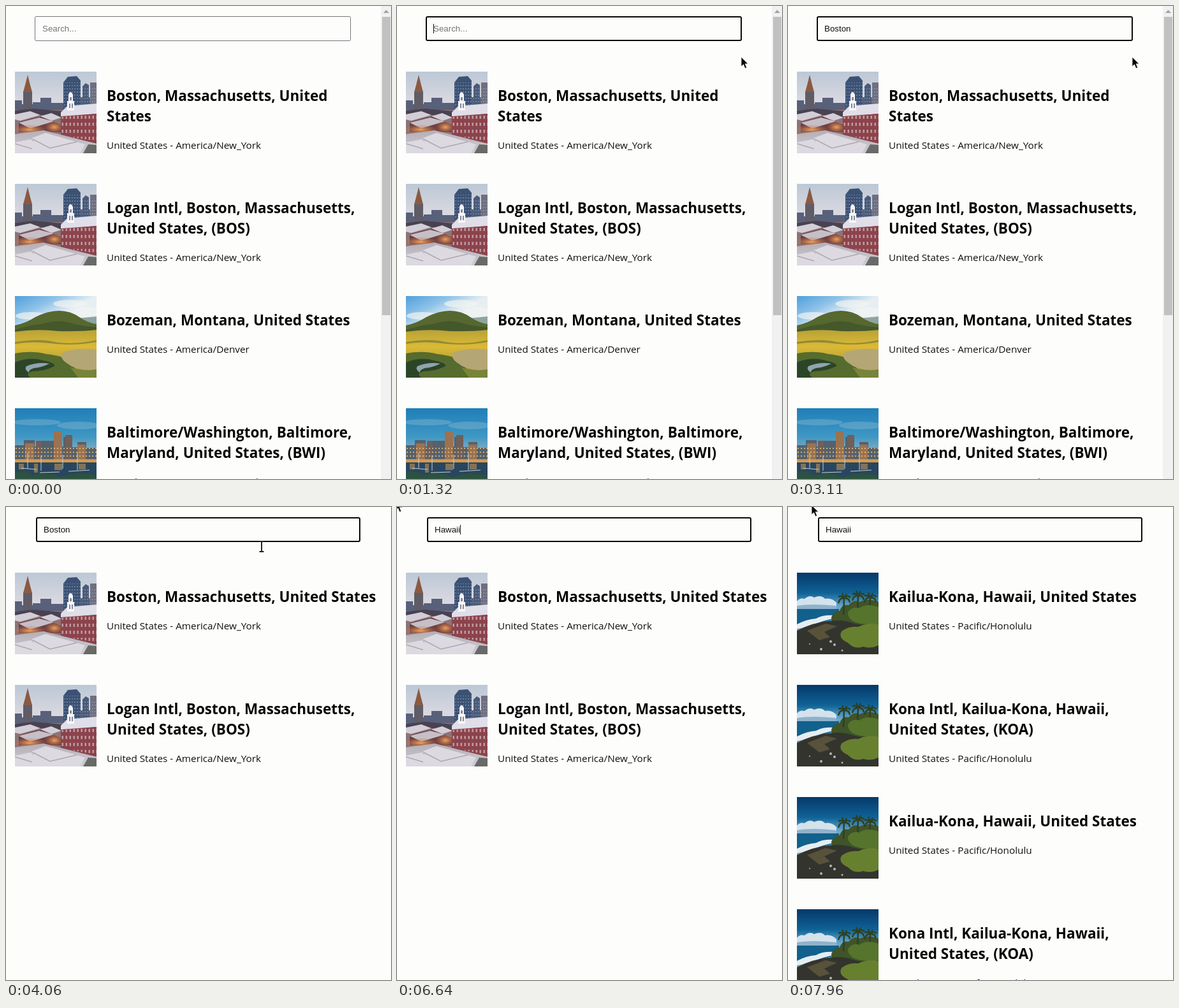
An HTML page for the animation above (8 s loop, 604 by 742 pixels).

```html
<!DOCTYPE html>
<html lang="en">
<head>
<meta charset="utf-8">
<title>Destination search</title>
<style>
  html, body { margin: 0; width: 100%; height: 100%; overflow: hidden; background: #fdfdfc; }
  svg { display: block; }
  .title { font: 700 22.5px "Open Sans", "Noto Sans", sans-serif; fill: #060606; }
  .zone { font: 400 15.3px "Open Sans", "Noto Sans", sans-serif; fill: #101010; }
  .field { font: 13.33px "Liberation Sans", Arial, sans-serif; white-space: pre; }
</style>
</head>
<body>
<svg id="stage" width="604" height="742" viewBox="0 0 604 742">
  <defs>
    <linearGradient id="citySky" x2="0" y2="1"><stop stop-color="#bcc8d6"/><stop offset=".45" stop-color="#e0dce2"/></linearGradient>
    <linearGradient id="hillSky" x2=".5" y2="1"><stop stop-color="#4f9fdc"/><stop offset=".22" stop-color="#8ec2e8"/><stop offset=".4" stop-color="#e6eef2"/></linearGradient>
    <linearGradient id="harborSky" x2="0" y2="1"><stop stop-color="#1f7fb8"/><stop offset=".35" stop-color="#3f97c4"/><stop offset=".55" stop-color="#8fb0c0"/></linearGradient>
    <linearGradient id="islandSky" x2="0" y2="1"><stop stop-color="#06386a"/><stop offset=".25" stop-color="#0f6396"/><stop offset=".42" stop-color="#6ba9cc"/></linearGradient>
    <linearGradient id="meadow" x2="0" y2="1"><stop stop-color="#b8a236"/><stop offset=".35" stop-color="#dcb936"/><stop offset="1" stop-color="#8a8c38"/></linearGradient>
    <linearGradient id="snow" x2="0" y2="1"><stop stop-color="#b4afb8"/><stop offset="1" stop-color="#cfccd2"/></linearGradient>
    <radialGradient id="glow"><stop stop-color="#f0a45c"/><stop offset="1" stop-color="#b86a4a" stop-opacity="0"/></radialGradient>
    <pattern id="sash" width="6" height="11" patternUnits="userSpaceOnUse"><rect x="1.5" y="3" width="2.5" height="5" fill="#c9b0b4" opacity=".8"/></pattern>
    <pattern id="panes" width="4" height="5" patternUnits="userSpaceOnUse"><rect x="1" y="1" width="2" height="2" fill="#a4b6cc" opacity=".4"/></pattern>
    <pattern id="lit" width="5" height="6" patternUnits="userSpaceOnUse"><rect x="1" y="2" width="2" height="2" fill="#f4cf80" opacity=".7"/></pattern>

    <symbol id="boston" viewBox="0 0 128 128">
      <path fill="url(#citySky)" d="M0 0h128v128H0z"/>
      <path fill="#58607a" d="M0 45h11v6h17v-3h12v-7h17v8h20v-9h51v38H0z"/>
      <path fill="#5f5c68" d="M13 62V31h14v31z"/>
      <path fill="#8a5a42" d="M20 5l2 8 2 8 3 11H13l3-11 2-8z"/>
      <path fill="#3c5274" d="M76 17l7-9 14-1 6 7v44H76z"/>
      <path fill="#4a5b7a" d="M106 23l5-5 5 3v40h-10z"/>
      <path fill="#6f6f80" d="M118 17h10v44h-10z"/>
      <path fill="url(#panes)" d="M76 17h27v40H76zM106 23h22v30h-22z"/>
      <path fill="#8b7478" d="M0 60h76v48H0z"/>
      <path fill="#4a4250" d="M0 61l30-3 44 4-3 11-30-5-41 5z"/>
      <path fill="#d2ced8" d="M0 67l24-5 16 6-32 9-8-2zM36 71l21-6 16 7-22 7z"/>
      <path fill="#6e3f40" d="M6 79l34-9 32 13v12H6z"/>
      <path fill="#c5bfc8" d="M6 80l32-8 23 6-37 11z"/>
      <ellipse cx="23" cy="91" rx="28" ry="8" fill="url(#glow)"/>
      <ellipse cx="62" cy="87" rx="16" ry="10" fill="url(#glow)"/>
      <path fill="#e0dee8" d="M72 64l10-10 46-4v16l-56 5z"/>
      <path fill="#f6f5f7" d="M82 61V46h2V36q3-8 7 0v10h2v15z"/>
      <path fill="#868a9a" d="M86 40h3v5h-3zM85 50h2v7h-2zM89 50h2v7h-2z"/>
      <path fill="#8c434c" d="M72 70l56-4v47l-56-12z"/>
      <path fill="url(#sash)" d="M73 71l55-5v43l-55-9z"/>
      <path fill="url(#snow)" d="M0 98l45-6 83 21v15H0z"/>
      <path fill="#dcdae0" d="M27 104l21-8 62 18-8 14H36zM0 111l25-5 20 22H0z"/>
      <path fill="none" stroke="#aca7b0" stroke-width="1.5" d="M28 106l27 14 42-10M0 113l27 8"/>
      <path fill="#686a68" d="M115 114l13 1v13h-21z"/>
    </symbol>

    <symbol id="bozeman" viewBox="0 0 128 128">
      <path fill="url(#hillSky)" d="M0 0h128v128H0z"/>
      <g fill="#f2f4f2" opacity=".7"><ellipse cx="26" cy="31" rx="25" ry="6"/><ellipse cx="87" cy="12" rx="27" ry="6"/><ellipse cx="112" cy="25" rx="22" ry="8"/></g>
      <path fill="#8fa5a0" d="M98 35l30-3v20H98z"/>
      <path fill="#56682f" d="M0 46q16-3 32-13 20-10 37-10 18 0 32 10 13 9 27 11v18H0z"/>
      <path fill="#44582b" d="M0 53q20-7 42-9 28-9 51 0 18 4 35 5v10H0z"/>
      <path fill="url(#meadow)" d="M0 56q35-5 68-1 35 1 60-2v75H0z"/>
      <path fill="#8f8d34" d="M0 72q40-6 62 0 30 5 66-3v3q-32 6-64 3-35-5-64 0z"/>
      <path fill="#566b2e" d="M0 90q27-5 49 1 29 3 36 12 11 13 22 25H0z"/>
      <path fill="#2c4529" d="M0 104q24-9 44-3 20 4 18 9-16 8-34 8-13 3-4 10H0z"/>
      <path fill="#8fa4ac" d="M18 110q18-7 36-4-12 6-24 7-9 3-8 7-8-5-4-10z"/>
      <path fill="#b5a676" d="M76 88q22-7 52-4v31q-30 4-47-10-13-9-5-17z"/>
      <path fill="#77843a" d="M87 112q24 7 41 3v13H99z"/>
    </symbol>

    <symbol id="baltimore" viewBox="0 0 128 128">
      <path fill="url(#harborSky)" d="M0 0h128v128H0z"/>
      <g fill="#8cbcd2" opacity=".4"><ellipse cx="34" cy="22" rx="38" ry="5"/><ellipse cx="100" cy="27" rx="34" ry="6"/></g>
      <path fill="#56616c" d="M0 58h14v-8h17v10h10V51h20v9h15V45h14v16h8V53h14v9h16v27H0z"/>
      <path fill="#9c7250" d="M61 36h13v48H61zM16 55h14v30H16zM98 57h13v28H98z"/>
      <path fill="#705f5a" d="M33 51h9v34h-9zM79 42h11v42H79z"/>
      <path fill="url(#lit)" d="M0 60h128v27H0z"/>
      <path fill="#d09a52" d="M0 80h128v5H0z"/>
      <path fill="#28465f" d="M0 85h128v43H0z"/>
      <path fill="#c69a5c" d="M6 87h8v9H6zM30 87h6v14h-6zM62 87h12v10H62zM100 87h11v9h-11z" opacity=".55"/>
      <path fill="none" stroke="#c8d0d4" d="M20 94V70M41 98V74M75 95V73M98 97V70M10 94l24 2M39 101l31-1M84 99l33-2"/>
      <path fill="#2c5240" d="M0 102q14-6 27 3 24-7 45 3 25-9 56-3v23H0z"/>
    </symbol>

    <symbol id="hawaii" viewBox="0 0 128 128">
      <path fill="url(#islandSky)" d="M0 0h128v128H0z"/>
      <path fill="#d4e2ec" d="M0 45q4-6 12-4 8-7 15-2 11-5 17 2 10-2 18 6v9H0z"/>
      <path fill="#8fb2cc" d="M0 52q22-4 62 0v7H0z"/>
      <path fill="#12608c" d="M0 57h66v14L0 89z"/>
      <path fill="#e6edf0" d="M0 81q15-8 30-9 10-6 28-5l4 4q-21 4-34 10-12 4-30 8z"/>
      <path fill="#3f5428" d="M54 70q4-10 13-10 4-12 14-9 8-10 18-5 11-7 29 0v48H56z"/>
      <g fill="none" stroke="#2e4024" stroke-width="2.5">
        <path id="palm" d="M73 66l1-26m-9 8q2-9 9-8 8-1 9 7m-18-9q5-3 9 2 5-6 10-1m-10 1l-3-8m3 8l4-7"/>
        <use href="#palm" x="22" y="-4"/>
        <use href="#palm" x="41" y="-1"/>
      </g>
      <path fill="#56742c" d="M80 62q8-10 18-6 10-9 30-2v26q-26 3-40-4-9-6-8-14z"/>
      <path fill="#33342e" d="M0 91q25-13 50-15 22-3 41 4l37 6v42H0z"/>
      <path fill="#58523a" d="M16 91l29-11 18 4-20 9 9 8-17 5z"/>
      <path fill="#67802f" d="M70 92q12-9 26-7 16-7 32-4v33q-12 6-24 2-14 5-24-6-16-7-10-18z"/>
      <g fill="#b9b8b0"><circle cx="53" cy="108" r="2"/><circle cx="59" cy="113" r="2"/><circle cx="38" cy="120" r="2"/><circle cx="71" cy="122" r="1.5"/><circle cx="20" cy="112" r="1"/></g>
    </symbol>
  </defs>

  <g id="scrollbar">
    <path fill="#f1f1f1" d="M588 0h16v742h-16z"/>
    <path fill="#c1c1c1" d="M590 17h13v468h-13z"/>
    <path fill="#a3a3a3" d="M592 11l4.5-5 4.5 5z"/>
  </g>
  <g id="lists"></g>
  <rect id="box" fill="#fdfdfc" rx="2"/>
  <rect id="mark" y="28" height="15" fill="#1884d8"/>
  <text class="field" id="value" y="40" xml:space="preserve"><tspan id="plain"></tspan><tspan id="picked" fill="#fff"></tspan></text>
  <path id="caret" stroke="#111"/>
  <g id="pointer">
    <path id="arrow" d="M0 0V15L3.5 11.8 6 17.8 8.6 16.7 6.2 10.8H10.8Z" fill="#080808" stroke="#f4f4f4" stroke-width=".8"/>
    <path id="beam" d="M-3.5-8h2.5l1 1 1-1h2.5M0-7V7M-3.5 8h2.5l1-1 1 1h2.5" fill="none" stroke="#222" stroke-width="2"/>
  </g>
</svg>
<script>
const LOOP = 8000, BLINK = 500;
const ENTER_BOSTON = 3520, ENTER_HAWAII = 7000, FOCUS = 900, SELECT = 4380;
const $ = id => document.getElementById(id);

const bostonAirport = ['boston', 'America/New_York', 'Logan Intl, Boston, Massachusetts,', 'United States, (BOS)'];
const kona = ['hawaii', 'Pacific/Honolulu', 'Kailua-Kona, Hawaii, United States'];
const konaAirport = ['hawaii', 'Pacific/Honolulu', 'Kona Intl, Kailua-Kona, Hawaii,', 'United States, (KOA)'];
const lists = [
  [
    ['boston', 'America/New_York', 'Boston, Massachusetts, United', 'States'],
    bostonAirport,
    ['bozeman', 'America/Denver', 'Bozeman, Montana, United States'],
    ['baltimore', 'America/New_York', 'Baltimore/Washington, Baltimore,', 'Maryland, United States, (BWI)']
  ],
  [['boston', 'America/New_York', 'Boston, Massachusetts, United States'], bostonAirport],
  [kona, konaAirport, kona, konaAirport]
];

function card([photo, zone, ...lines], row) {
  const top = 103 + row * 176;
  const text = (kind, y, s) => `<text class="${kind}" x="158" y="${y}">${s}</text>`;
  return `<use href="#${photo}" x="14" y="${top}" width="128" height="128"/>` +
    lines.map((line, i) => text('title', top + 46 + i * 32, line)).join('') +
    text('zone', top + 57 + lines.length * 32, 'United States - ' + zone);
}
$('lists').innerHTML = lists.map(list => `<g>${list.map(card).join('')}</g>`).join('');

// Pointer path: time, x, y
const path = [
  [150, 606, 250], [650, 500, 45], [950, 497, 40], [1200, 540, 80], [3750, 540, 80],
  [4060, 401, 62], [4300, 112, 38], [4400, 103, 36], [4750, 40, 14], [4900, -2, -10],
  [7500, -2, -10], [7900, 37, -3], [LOOP, 37, -3]
];
// Key presses: start, gap between letters, word
const words = [[1900, 120, 'Boston'], [5600, 160, 'Hawaii']];

function pointerAt(t) {
  const i = Math.max(1, path.findIndex(p => p[0] > t));
  const [t0, x0, y0] = path[i - 1], [t1, x1, y1] = path[i];
  const k = Math.min(1, Math.max(0, (t - t0) / (t1 - t0)));
  const e = k * k * (3 - 2 * k);
  return [x0 + (x1 - x0) * e, y0 + (y1 - y0) * e];
}

function typedAt(t) {
  let value = '', since = FOCUS;
  for (const [start, gap, word] of words) {
    if (t < start) continue;
    const n = Math.min(word.length, 1 + Math.floor((t - start) / gap));
    value = word.slice(0, n);
    since = start + (n - 1) * gap;
  }
  return [value, since];
}

const setAttrs = (node, attrs) => Object.entries(attrs).forEach(([k, v]) => node.setAttribute(k, v));
const show = (node, on) => { node.style.display = on ? '' : 'none'; };

function render(t) {
  const step = t < ENTER_BOSTON ? 0 : t < ENTER_HAWAII ? 1 : 2;
  [...$('lists').children].forEach((g, i) => show(g, i === step));
  show($('scrollbar'), step === 0);

  const focused = t >= FOCUS, inset = focused ? 1 : .5;
  const left = step ? 47 : 45, width = step ? 509 : 496;
  setAttrs($('box'), {
    x: left + inset, y: 16 + inset, width: width - 2 * inset, height: 39 - 2 * inset,
    stroke: focused ? '#0a0a0a' : '#76767c', 'stroke-width': 2 * inset
  });

  const [x, y] = pointerAt(t);
  const [value, since] = typedAt(t);
  const textX = left + 12, field = $('value');
  setAttrs(field, { x: textX, fill: value ? '#101010' : '#757575' });

  // Measure the whole value before splitting off the selected letters
  $('plain').textContent = value || 'Search...';
  $('picked').textContent = '';
  const edge = i => i ? textX + field.getSubStringLength(0, i) : textX;
  let from = value.length;
  if (t >= SELECT && t < words[1][0]) {
    while (from > 0 && (edge(from - 1) + edge(from)) / 2 > x) from--;
  }
  const hasPick = from < value.length;
  const end = edge(value.length), pickX = edge(from);
  if (hasPick) {
    $('plain').textContent = value.slice(0, from);
    $('picked').textContent = value.slice(from);
  }
  setAttrs($('mark'), { x: pickX, width: end - pickX });
  show($('mark'), hasPick);
  $('caret').setAttribute('d', `M${Math.floor(end) + .5} 28v15`);
  show($('caret'), focused && !hasPick && Math.floor((t - since) / BLINK) % 2 === 0);

  const beam = (t > 600 && t < 1020) || (t > 3980 && t < 4840);
  show($('pointer'), t >= path[0][0]);
  show($('arrow'), !beam);
  show($('beam'), beam);
  $('pointer').setAttribute('transform', `translate(${x} ${y})`);
}

const begin = performance.now();
function tick() {
  render((performance.now() - begin) % LOOP);
  requestAnimationFrame(tick);
}
tick();
</script>
</body>
</html>
```
